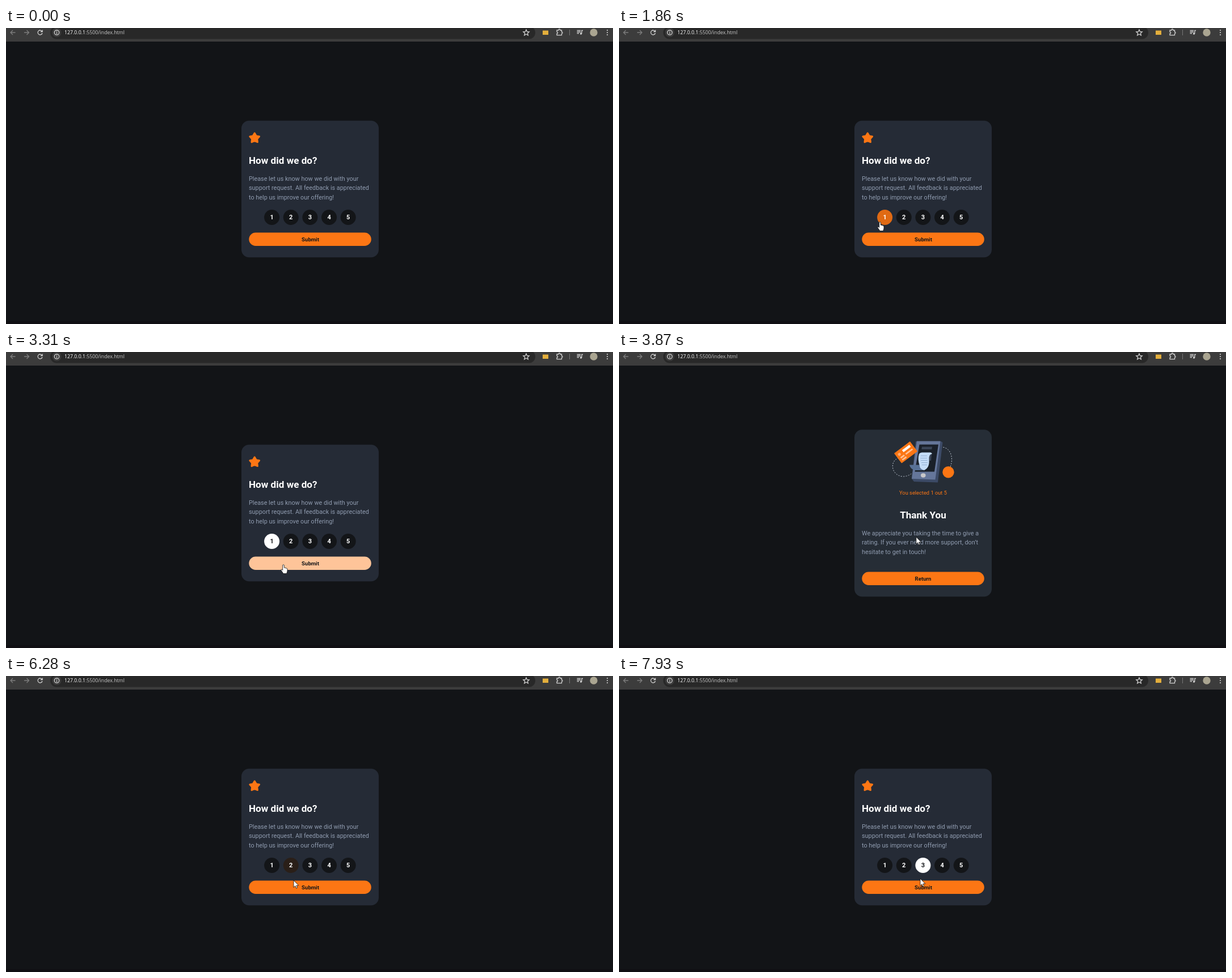
Write an HTML page that moves like this. It is 1070x523 px and loops after 8 s.

```html
<!DOCTYPE html>
<html lang="en">
<head>
<meta charset="utf-8">
<title>Rating card</title>
<style>
  html, body { margin: 0; width: 100%; height: 100%; overflow: hidden; background: #121417; }
  svg { display: block; }
  text { font-family: Roboto, sans-serif; }
  .title { font-size: 17.1px; font-weight: 700; fill: #fff; }
  .body { font-size: 10.84px; fill: #909cb0; }
  .label { font-size: 9.6px; font-weight: 700; fill: #131518; }
  .digit { font-size: 11px; font-weight: 700; }
  .mid { text-anchor: middle; }
  .icon { fill: none; stroke: #d0d0d0; stroke-width: 1.3; }
  .dots { fill: none; stroke: #c4ccd8; stroke-width: 1; stroke-dasharray: 2 2.4; }
</style>
</head>
<body>
<svg width="1070" height="523" viewBox="0 0 1070 523">
  <rect y="518" width="1070" height="5" fill="#100f13"/>

  <g id="toolbar">
    <rect width="1070" height="24" fill="#3c3c3c"/>
    <rect x="78" y="-3" width="855" height="22.5" rx="11.2" fill="#282828"/>
    <g class="icon">
      <path d="M16.5 8H8M12 4L8 8L12 12M32 8H40.5M36.500 4L40.500 8L36.500 12" stroke="#7c7c7c" style="stroke:#7c7c7c"/>
      <path d="M63.600 6A4 4 0 1 0 64 9M64.200 3.500V6.500H61"/>
      <circle cx="89.500" cy="8" r="8" style="fill:#3c3c3c;stroke:none"/>
      <circle cx="89.500" cy="8" r="4.200"/>
      <path d="M89.500 7.500V10.500M89.500 5.300V6.500"/>
      <path d="M917 3L918.500 6.500L922.200 6.800L919.400 9.300L920.300 13L917 11L913.700 13L914.600 9.300L911.800 6.800L915.500 6.500Z"/>
      <path d="M971 4H974V3.500A1.500 1.500 0 0 1 977 3.500V4H979.500V7A1.500 1.500 0 0 1 979.500 10V12.700H971V10A1.600 1.600 0 0 0 971 6.800Z"/>
      <path d="M1006.500 4.500H1013M1006.500 7H1013M1006.500 9.500H1010M1014.800 10V4.500H1017"/>
    </g>
    <circle cx="1013.500" cy="10" r="1.700" fill="#d0d0d0"/>
    <rect x="946" y="4.500" width="10" height="7.500" fill="#e3ae3c"/>
    <rect x="993" y="3" width="1" height="10" fill="#777"/>
    <circle cx="1036" cy="8" r="6.700" fill="#aaa591"/>
    <path d="M1060 4V4M1060 8V8M1060 12V12" stroke="#d0d0d0" stroke-width="2.200" stroke-linecap="round"/>
    <text x="103" y="11.300" fill="#c7c7c7" style="font:8.75px 'Open Sans',sans-serif"><tspan fill="#fff">127.0.0.1</tspan>:5500/index.html</text>
  </g>

  <g id="form">
    <rect x="415" y="163.700" width="242" height="241.500" rx="13.500" fill="#252b36"/>
    <polygon id="star" fill="#fc7614" stroke="#fc7614" stroke-width="3" stroke-linejoin="round"/>
    <text class="title" x="428" y="240">How did we do?</text>
    <text class="body" y="269.600">
      <tspan x="428">Please let us know how we did with your</tspan>
      <tspan x="428" dy="16.800">support request. All feedback is appreciated</tspan>
      <tspan x="428" dy="16.800">to help us improve our offering!</tspan>
    </text>
    <g id="ratings"></g>
    <rect class="button" x="428.300" y="361.500" width="215.500" height="23.500" rx="11.750"/>
    <text class="label mid" x="536.500" y="376.500">Submit</text>
  </g>

  <g id="thanks">
    <rect x="415" y="137.300" width="242" height="294.900" rx="13.500" fill="#262d36"/>
    <path class="dots" d="M493 187C476 193 480 218 500 220Q510 220 518 213M567 168C583 167 591 185 584 203"/>
    <path d="M523 158L568 158L570.500 160L562 230.500L520 229L516 224Z" fill="#3c4a66"/>
    <path d="M525 157.500H566.500L557.500 225.500L516 224Z" fill="#65769a"/>
    <path d="M529.500 163.500H563L556 211.500H521.500Z" fill="#1a2029"/>
    <path d="M534 167.500H552L551.300 172H533.300Z" fill="#3a4557"/>
    <path d="M546 180H551L550 192H545Z" fill="#3a4557"/>
    <ellipse cx="536.300" cy="218" rx="4.300" ry="3.700" fill="#c8c8ca"/>
    <path d="M512 199.500H535Q532 207 538 209H523Q514 208 512 199.500Z" fill="#587196"/>
    <path d="M529 180Q531 177 535 177.500H548Q551 177 552 180Q546 180 546.500 190Q548 204 538 209Q530 207 530 201Q526 189 529 180Z" fill="#c4dcf7"/>
    <path d="M532 183.500H543M531.500 187.500H543M532 191.500H543.500M533 195.500H544M534 199.500H543" stroke="#93afd2" stroke-width="1"/>
    <g transform="translate(505.500 177.300) rotate(-37)">
      <rect x="-17.500" y="-11" width="35" height="22" rx="1" fill="#fc7614"/>
      <rect x="-3" y="-7" width="16" height="4.500" fill="#fff"/>
      <path d="M-13 2.500H-5M-2 2.500H13M-13 7H-4" stroke="#ffc195" stroke-width="2.700"/>
      <circle cx="-11" cy="-4" r="2.600" fill="#ffad72"/>
    </g>
    <circle cx="580.500" cy="212.300" r="10.200" fill="#fc7614"/>
    <text class="mid" x="536" y="252" font-size="9.300" fill="#fc7614">You selected 1 out 5</text>
    <text class="title mid" x="536" y="294">Thank You</text>
    <text class="body" y="323.500">
      <tspan x="428">We appreciate you taking the time to give a</tspan>
      <tspan x="428" dy="16.800">rating. If you ever need more support, don’t</tspan>
      <tspan x="428" dy="16.800">hesitate to get in touch!</tspan>
    </text>
    <rect class="button" x="428.300" y="388.500" width="215.500" height="23.500" rx="11.750"/>
    <text class="label mid" x="536" y="403.500">Return</text>
  </g>

  <path id="cursor" stroke-linejoin="round"/>
</svg>

<script>
const LOOP = 8000, STEP = 70;
const DARK = [19, 21, 24], ORANGE = [252, 118, 20], WHITE = [255, 255, 255];
const THANKS_FROM = 3520, THANKS_TO = 5690;

const spans = [[340, 1100], [1170, 1940], [1990, 2760], [2830, 3600], [3730, 4210],
  [4610, 5370], [5440, 6210], [6280, 7040], [7110, 7800], [7930, 7930]];

const shapes = {
  arrow: 'M0 0V12.500L2.900 9.800L4.700 14L6.700 13.200L4.900 9.100H8.800Z',
  hand: 'M-1.300 .5Q0 -1 1.300 .5V5L5 5.800Q7 6.300 7 8V11Q6.800 13 5.500 15.500H0L-4 9.800Q-4.300 7.500 -2.800 8L-1.300 9.500Z',
  beam: 'M-2.500 -7H2.500M0 -7V7M-2.500 7H2.500'
};

// Pointer path: time, x, y, and the shape shown from then on.
const pointer = [
  [340, 1003, 460, 'arrow'], [640, 700, 345, 'arrow'], [880, 424, 318, 'arrow'],
  [1060, 459, 334, 'hand'], [1170, 470, 334, 'hand'], [1450, 611, 330, 'hand'],
  [1560, 606, 338, 'hand'], [1760, 480, 342, 'hand'], [1870, 460, 343, 'hand'],
  [1940, 462, 338, 'hand'], [2040, 440, 336, 'arrow'], [2160, 401, 334, 'arrow'],
  [2340, 460, 336, 'hand'], [2600, 466, 338, 'hand'], [2760, 516, 338, 'arrow'],
  [2900, 506, 348, 'arrow'], [3150, 488, 366, 'hand'], [3320, 489, 376, 'hand'],
  [3520, 494, 375, 'arrow'], [3600, 495, 374, 'arrow'], [3730, 497, 370, 'arrow'],
  [4100, 568, 256, 'beam'], [4210, 578, 249, 'beam'], [4610, 578, 250, 'beam'],
  [4750, 565, 262, 'arrow'], [5000, 548, 330, 'beam'], [5120, 546, 362, 'arrow'],
  [5310, 545, 392, 'hand'], [5370, 545, 396, 'hand'], [5690, 546, 394, 'arrow'],
  [5850, 520, 365, 'arrow'], [5980, 508, 346, 'hand'], [6100, 503, 338, 'hand'],
  [6200, 506, 355, 'arrow'], [6280, 507, 361, 'arrow'], [6430, 528, 342, 'hand'],
  [6600, 537, 335, 'hand'], [7040, 536, 340, 'hand'], [7130, 536, 358, 'arrow'],
  [7190, 537, 366, 'hand'], [7300, 538, 378, 'hand'], [7450, 536, 352, 'arrow'],
  [7490, 536, 345, 'hand'], [7570, 535, 318, 'arrow'], [7630, 535, 311, 'arrow'],
  [7700, 535, 324, 'hand'], [7800, 534, 336, 'hand'], [7930, 531, 358, 'arrow']
];

// Rating levels over time: 0 idle, 1 hovered, 2 chosen.
const ratingTracks = [
  [[1050, 0], [1200, .5], [1350, 0], [1650, 0], [1900, 1], [2040, 1], [2280, 0], [2330, 0],
   [2560, 1], [2590, 1], [2740, 2], [3520, 2], [3521, 0]],
  [[1200, 0], [1285, .35], [1390, 0], [1700, 0], [1760, .3], [1850, 0], [2640, 0], [2750, .45],
   [2890, 0], [6060, 0], [6160, .6], [6280, .1], [6310, 0]],
  [[1270, 0], [1350, .35], [1460, 0], [1640, 0], [1700, .3], [1790, 0], [6420, 0], [6680, 1],
   [6850, 1], [7075, 2]],
  [[1340, 0], [1420, .35], [1530, 0], [1580, 0], [1650, .3], [1740, 0]],
  [[1400, 0], [1590, .7], [1800, 0]]
];
const buttonTrack = [[3150, 0], [3450, 1], [3520, 1], [3521, 0], [5310, 0], [5600, 1],
  [5690, 1], [5691, 0], [7180, 0], [7390, .7], [7600, 0]];

const $ = id => document.getElementById(id);
const lerp = (a, b, k) => a + (b - a) * k;
const mix = (a, b, k) => `rgb(${a.map((v, i) => Math.round(lerp(v, b[i], k)))})`;

function sample(keys, t, column = 1) {
  const i = keys.findIndex(key => key[0] > t);
  if (i < 0) return keys[keys.length - 1][column];
  if (i === 0) return keys[0][column];
  const a = keys[i - 1], b = keys[i];
  return lerp(a[column], b[column], (t - a[0]) / (b[0] - a[0]));
}

function heldTime(t) {
  const span = spans.filter(([from]) => from <= t).pop();
  if (!span) return 0;
  const [from, to] = span;
  return Math.min(to, from + STEP * Math.floor((t - from) / STEP + .2));
}

$('star').setAttribute('points', Array.from({ length: 10 }, (_, i) => {
  const r = i % 2 ? 4.8 : 8.8, a = i * Math.PI / 5;
  return [438.2 + r * Math.sin(a), 194.5 - r * Math.cos(a)];
}).join(' '));

$('ratings').innerHTML = ratingTracks.map((_, i) => {
  const x = 468.6 + i * 33.65;
  return `<circle cx="${x}" cy="334.500" r="13.500"/><text class="digit mid" x="${x}" y="338">${i + 1}</text>`;
}).join('');
const discs = document.querySelectorAll('#ratings circle');
const digits = document.querySelectorAll('#ratings text');
const buttons = document.querySelectorAll('.button');

function drawPointer(t) {
  const key = pointer.filter(([from]) => from <= t).pop();
  const cursor = $('cursor');
  cursor.style.display = key ? '' : 'none';
  if (!key) return;
  const beam = key[3] === 'beam';
  cursor.setAttribute('d', shapes[key[3]]);
  cursor.setAttribute('fill', beam ? 'none' : '#fff');
  cursor.setAttribute('stroke', beam ? '#fff' : '#111');
  cursor.setAttribute('stroke-width', beam ? 1 : .8);
  cursor.setAttribute('transform', `translate(${sample(pointer, t, 1)} ${sample(pointer, t, 2)})`);
}

function draw(now) {
  const t = heldTime(now % LOOP);
  const thanks = t >= THANKS_FROM && t < THANKS_TO;
  $('form').style.display = thanks ? 'none' : '';
  $('thanks').style.display = thanks ? '' : 'none';
  ratingTracks.forEach((track, i) => {
    const level = sample(track, t);
    discs[i].style.fill = level < 1 ? mix(DARK, ORANGE, level) : mix(ORANGE, WHITE, level - 1);
    digits[i].style.fill = mix(WHITE, DARK, Math.max(0, level - 1));
  });
  const fill = mix(ORANGE, WHITE, sample(buttonTrack, t));
  buttons.forEach(button => button.style.fill = fill);
  drawPointer(t);
}

let start;
function tick(now) {
  start ??= now;
  draw(now - start);
  requestAnimationFrame(tick);
}
draw(0);
requestAnimationFrame(tick);
</script>
</body>
</html>
```
